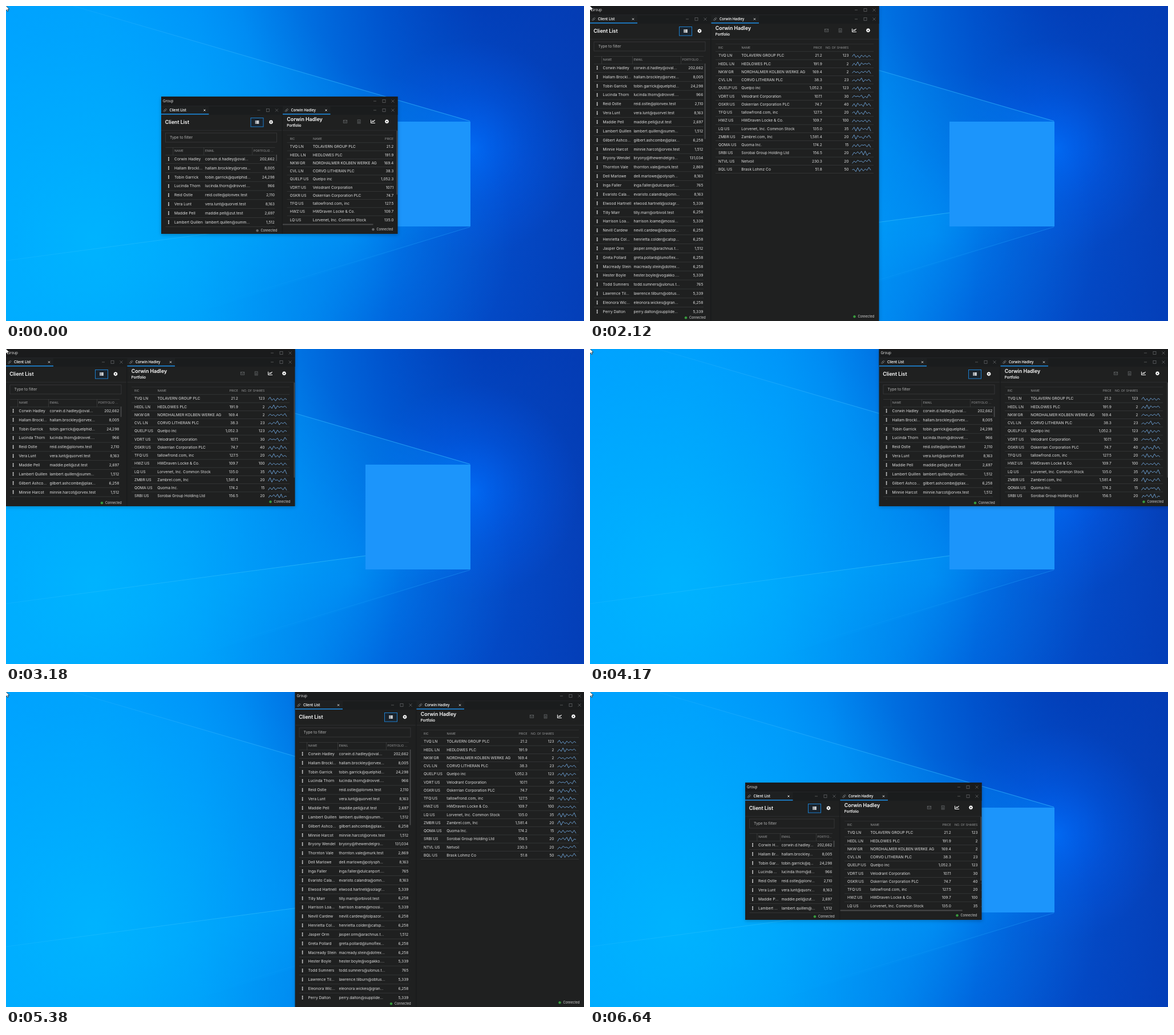
An HTML page with a canvas for the animation above (7900 ms loop, 1013 by 553 pixels).

```html
<!DOCTYPE html>
<html lang="en">
<head>
<meta charset="utf-8">
<title>Window snapping</title>
<style>
  html, body { margin: 0; width: 100%; height: 100%; overflow: hidden; background: #0a8cf5; }
  canvas { display: block; width: 1013px; height: 553px; }
</style>
</head>
<body>
<canvas id="stage" width="1013" height="553"></canvas>
<script>
const W = 1013, H = 553, LOOP = 7900;
const UI = 'Inter, sans-serif', FRAME = '"Open Sans", sans-serif';
const ctx = document.getElementById('stage').getContext('2d');

// name | mail domain | portfolio value
const clients = `Corwin Hadley|ovalmail.test|202,662
Hallam Brockley|orvex.test|8,005
Tobin Garrick|quelphid.test|24,298
Lucinda Thorn|drovvel.test|966
Reid Ostle|plonvex.test|2,110
Vera Lunt|quorvel.test|8,163
Maddie Pell|zut.test|2,697
Lambert Quillen|summerb.test|1,512
Gilbert Ashcombe|plaxo.test|6,258
Minnie Harcot|orvex.test|1,512
Bryony|thewendelgroup.test|131,034
Thornton Vale|murk.test|2,869
Dell Marlowe|polyspherix.test|8,163
Inga Faller|dulcanport.test|765
Evaristo Calandra|omnivar.test|8,163
Elwood Hartnell|solagro.test|5,339
Tilly Marr|orbivoil.test|6,258
Harrison Loame|mossiel.test|5,339
Nevill Cardew|tolpazor.test|6,258
Henrietta Colder|catspan.test|6,258
Jasper Orm|arachnus.test|1,512
Greta Pollard|lumoflexa.test|6,258
Macready Stein|dotrexa.test|6,258
Hester Boyle|vogakko.test|5,339
Todd Sumners|ulonus.test|765
Lawrence Tilburn|obtusa.test|5,339
Eleonora Wickes|grangel.test|6,258
Perry Dalton|suppliden.test|5,339`.split('\n').map((line, i) => {
  const [name, domain, value] = line.split('|');
  const user = name.toLowerCase().replace(' ', i ? '.' : '.d.');
  return { name: name === 'Bryony' ? 'Bryony Wendel' : name, email: user + '@' + domain, value };
});

const holdings = `TVQ:LN|TOLAVERN GROUP PLC|21.2|123
HEDL:LN|HEDLOWES PLC|191.9|2
NKW:GR|NORDHALMER KOLBEN WERKE AG|169.4|2
CVL:LN|CORVO LITHERAN PLC|38.3|23
QUELP:US|Quelpo inc|1,052.3|123
VDRT:US|Velodrant Corporation|107.1|30
OSKR:US|Oskerrian Corporation PLC|74.7|40
TFQ:US|tallowfrond.com, inc|127.5|20
HWZ:US|HWDraven Locke & Co.|109.7|100
LQ:US|Lorvenet, Inc. Common Stock|135.0|35
ZMBR:US|Zambrel.com, Inc|1,581.4|20
QOMA:US|Quoma Inc.|174.2|15
SRBI:US|Sorobai Group Holding Ltd|156.5|20
NTVL:US|Netvoil|230.3|20
BQL:US|Brask Lohmz Co|51.8|50`.split('\n').map(line => line.split('|'));

// Each step changes some of the window bounds; the views catch up a little later.
const steps = [
  [0, { x: 272.5, y: 160, w: 414, h: 240, viewW: 414, viewH: 240, split: 212.5, online: false }],
  [1840, { x: 0, y: 0, online: true }],
  [1910, { w: 506.5, h: 553 }],
  [1980, { viewW: 506.5 }],
  [2050, { viewH: 553 }],
  [3110, { h: 276 }],
  [3180, { viewH: 276 }],
  [4170, { x: 507 }],
  [5310, { h: 553 }],
  [5380, { viewH: 553 }],
  [6440, { x: 272.5, y: 160, w: 414, h: 240 }],
  [6510, { viewH: 240 }],
  [6580, { viewW: 414 }],
  [6640, { split: 166 }]
];
const stateAt = t => Object.assign({}, ...steps.filter(s => s[0] <= t).map(s => s[1]));

function text(g, str, x, y, size, color, { weight = 400, align = 'left', font = UI } = {}) {
  g.font = `${weight} ${size}px ${font}`;
  g.textAlign = align;
  g.fillStyle = color;
  g.fillText(str, x, y + size * 0.36);
}

function fit(g, str, width, size) {
  g.font = `400 ${size}px ${UI}`;
  if (g.measureText(str).width <= width) return str;
  while (str && g.measureText(str + '...').width > width) str = str.slice(0, -1);
  return str + '...';
}

function rect(g, x, y, w, h, color) {
  g.fillStyle = color;
  g.fillRect(x, y, w, h);
}

function path(g, points, color, width = 0.8) {
  g.beginPath();
  points.forEach(([x, y]) => g.lineTo(x, y));
  g.strokeStyle = color;
  g.lineWidth = width;
  g.stroke();
}

function frameRect(g, x, y, w, h, color, width = 1) {
  g.strokeStyle = color;
  g.lineWidth = width;
  g.strokeRect(x, y, w, h);
}

function disc(g, x, y, r, color) {
  g.beginPath();
  g.arc(x, y, r, 0, 7);
  g.fillStyle = color;
  g.fill();
}

function clipped(g, x, y, w, h, draw) {
  g.save();
  g.beginPath();
  g.rect(x, y, w, h);
  g.clip();
  draw();
  g.restore();
}

function cross(g, x, y, r, color, width) {
  path(g, [[x - r, y - r], [x + r, y + r]], color, width);
  path(g, [[x - r, y + r], [x + r, y - r]], color, width);
}

function windowButtons(g, right, y) {
  const color = '#606264';
  path(g, [[right - 42.5, y], [right - 37.5, y]], color);
  frameRect(g, right - 26.5, y - 2.5, 5, 5, color, 0.8);
  cross(g, right - 8.5, y, 2.5, color, 0.8);
}

function tab(g, x, label) {
  rect(g, x, 16, 83.5, 15, '#1e2021');
  rect(g, x, 29, 83.5, 1.6, '#1c88dc');
  g.save();
  g.translate(x + 6.8, 23);
  g.rotate(-Math.PI / 4);
  for (const dx of [-3, -0.2]) frameRect(g, dx, -1.1, 3.2, 2.2, '#85888a', 0.7);
  g.restore();
  text(g, label, x + 14.5, 23, 6.2, '#fff', { weight: 600, font: FRAME });
  cross(g, x + 76, 23, 1.5, '#eee', 0.9);
}

function gear(g, x, y) {
  for (let i = 0; i < 8; i++) {
    const a = i * Math.PI / 4, c = Math.cos(a), s = Math.sin(a);
    path(g, [[x + c, y + s], [x + c * 3.5, y + s * 3.5]], '#fff', 1.6);
  }
  disc(g, x, y, 2.7, '#fff');
  disc(g, x, y, 1.1, '#1f2021');
}

function listIcon(g, x, y) {
  for (let i = -1; i <= 1; i++) {
    rect(g, x - 3.2, y + i * 2 - 0.8, 1.7, 1.5, '#fff');
    rect(g, x - 1, y + i * 2 - 0.8, 4.4, 1.5, '#fff');
  }
}

function portfolioIcons(g, right) {
  const dim = '#65686a', y = 42.8;
  frameRect(g, right - 95.2, y - 2.4, 6.4, 4.8, dim, 0.8);
  path(g, [[right - 95, y - 1.5], [right - 92, y + 0.8], [right - 89, y - 1.5]], dim);
  frameRect(g, right - 70.3, y - 3, 4.8, 6.2, dim, 0.8);
  for (const dy of [-0.8, 0.6, 1.8]) path(g, [[right - 69.2, y + dy], [right - 66.6, y + dy]], dim, 0.6);
  path(g, [[right - 47, y - 3], [right - 47, y + 2.7], [right - 39.5, y + 2.7]], '#fff', 1);
  path(g, [[right - 45.6, y + 1], [right - 43.8, y - 1], [right - 42.6, y + 0.1], [right - 40, y - 2.6]], '#fff', 1.1);
  gear(g, right - 19, y);
}

function status(g, right, y, online) {
  text(g, 'Connected', right - 8.5, y, 5.5, '#d8d8d8', { align: 'right' });
  disc(g, right - 43, y, 2.2, online ? '#389b3d' : '#66686a');
}

function clientList(g, s) {
  const right = s.split - 1.5, slack = 211 - right;
  const emailSep = 74 - slack * 0.29, valueSep = 159 - slack * 0.763;
  const bottom = s.viewH - 12, area = bottom - 101;

  text(g, 'Client List', 6.3, 43.5, 8.8, '#fff', { weight: 600 });
  rect(g, right - 54.5, 36.5, 22, 15.5, '#1a232c');
  frameRect(g, right - 54.5, 36.5, 22, 15.5, '#1c7fce');
  listIcon(g, right - 43.5, 44);
  gear(g, right - 19, 43.7);
  frameRect(g, 7, 63, right - 16, 16, '#3a3b3c', 0.8);
  text(g, 'Type to filter', 14.5, 71, 6.7, '#b6b6b6');

  rect(g, 7, 88, right - 19, 0.7, '#3b3c3d');
  rect(g, 7, 101.5, right - 19, 0.7, '#3b3c3d');
  for (const x of [20, emailSep, valueSep]) rect(g, x, 88, 0.7, 13.5, '#414243');
  text(g, 'NAME', 22.8, 94.5, 5.3, '#98999a');
  text(g, 'EMAIL', emailSep + 2.5, 94.5, 5.3, '#98999a');
  text(g, slack ? 'PORTFO...' : 'PORTFOLIO ...', valueSep + 2.5, 94.5, 5.1, '#98999a');

  clipped(g, 0, 100, right, bottom - 100, () => {
    clients.forEach((c, i) => {
      const y = 108.5 + i * 15.85;
      if (y > bottom + 10) return;
      for (const dy of [-2.3, 0, 2.3]) rect(g, 11.8, y + dy - 0.8, 1.6, 1.6, '#fff');
      text(g, fit(g, c.name, emailSep - 24, 6.7), 22.5, y, 6.7, '#e0e0e0');
      text(g, fit(g, c.email, valueSep - emailSep - 4, 6.7), emailSep + 2.5, y, 6.7, '#e0e0e0');
      text(g, c.value, right - 12.7, y, 6.6, '#e0e0e0', { align: 'right' });
      rect(g, 7, y + 7.6, right - 19, 0.7, '#3b3c3d');
    });
  });
  rect(g, right - 10.3, 101, 1.7, area * area / 1460, '#4a4b4c');
  status(g, right, s.viewH - 5.8, s.online);
}

function sparkline(g, x, y, seed) {
  const points = [];
  for (let i = 0; i < 11; i++) {
    const noise = Math.sin((seed + 1) * 12.9 + i * 78.2) * 437.5;
    const level = noise - Math.floor(noise);
    const swing = i % 2 ? 1 : -1;
    points.push([x + i * 3.25, y + 0.5 - swing * (0.3 + level * 3.7)]);
  }
  path(g, points, '#6fa5dc', 0.9);
}

function portfolio(g, s) {
  const left = s.split, right = s.viewW, paneW = right - left;
  const wide = paneW > 285;
  const bottom = s.viewH - (wide ? 15 : 18), area = s.viewH - 17 - 59;
  const priceX = left + 194.3, sharesX = left + 241;

  text(g, clients[0].name, left + 7.3, 39.2, 8.8, '#fff', { weight: 600 });
  text(g, 'Portfolio', left + 7.3, 50.2, 6.2, '#fff', { weight: 600 });
  portfolioIcons(g, right);

  clipped(g, left, 60, paneW - 1, bottom - 60, () => {
    const lineW = paneW - 17;
    const gray = '#98999a';
    rect(g, left + 7.5, 66.5, lineW, 0.7, '#343536');
    text(g, 'RIC', left + 12.5, 73, 5.3, gray);
    text(g, 'NAME', left + 53, 73, 5.3, gray);
    text(g, 'PRICE', priceX, 73, 5.3, gray, { align: 'right' });
    text(g, 'NO. OF SHARES', sharesX, 73, 5.3, gray, { align: 'right' });
    rect(g, left + 7.5, 79.5, lineW, 0.7, '#3b3c3d');
    holdings.forEach(([ric, name, price, shares], i) => {
      const y = 87 + i * 14.25;
      text(g, ric, left + 12.5, y, 6.6, '#e0e0e0');
      text(g, name, left + 52.7, y, 6.7, '#e0e0e0');
      text(g, price, priceX, y, 6.6, '#e0e0e0', { align: 'right' });
      text(g, shares, sharesX, y, 6.6, '#e0e0e0', { align: 'right' });
      sparkline(g, left + 247, y, i);
      rect(g, left + 7.5, y + 6.8, lineW, 0.7, '#3b3c3d');
    });
  });
  if (area < 240) rect(g, right - 2, 59, 1.6, area * area / 240, '#48494a');
  if (!wide) rect(g, left, s.viewH - 17.5, paneW * paneW / (122 + paneW * 0.666), 2, '#48494a');
  status(g, right, s.viewH - 7.8, s.online);
}

function groupWindow(g, s) {
  g.save();
  g.translate(s.x, s.y);
  g.shadowColor = 'rgba(0,0,0,.22)';
  g.shadowBlur = 6;
  g.shadowOffsetY = 2;
  rect(g, -0.5, -1, s.w + 0.5, s.h + 1, '#1f2020');
  g.shadowColor = 'transparent';

  clipped(g, -0.5, -1, s.w + 0.5, s.h + 1, () => {
    rect(g, -0.5, -1, s.w + 1, 16, '#1a1b1c');
    rect(g, -0.5, 15, s.w + 1, 16, '#1a1c1d');
    rect(g, -0.5, 15, s.w + 1, 0.7, '#26292b');
    text(g, 'Group', 2.5, 7.2, 6.2, '#eee', { font: FRAME });
    windowButtons(g, s.w, 7);
    tab(g, -0.5, 'Client List');
    tab(g, s.split, clients[0].name);
    windowButtons(g, s.split - 2, 23);
    windowButtons(g, s.w, 23);
    rect(g, -0.5, 57.8, s.w + 1, 0.8, '#303132');
    rect(g, s.split - 1.5, 31, 1.5, s.viewH - 31, '#191a1b');
    clientList(g, s);
    portfolio(g, s);
  });
  g.restore();
}

function gradient(g, shape, ...stops) {
  const fill = shape.length === 4 ? g.createLinearGradient(...shape)
    : g.createRadialGradient(shape[0], shape[1], 0, shape[0], shape[1], shape[2]);
  stops.forEach((c, i) => fill.addColorStop(i / (stops.length - 1), c));
  return fill;
}

function polygon(g, points, fill) {
  g.beginPath();
  points.forEach(([x, y]) => g.lineTo(x, y));
  g.fillStyle = fill;
  g.fill();
}

function makeDesktop() {
  const canvas = document.createElement('canvas');
  canvas.width = W;
  canvas.height = H;
  const g = canvas.getContext('2d');
  const wash = (...args) => rect(g, 0, 0, W, H, gradient(g, ...args));

  wash([0, 0, W, 0], '#009eff', '#009cfc', '#0090f8', '#007bea', '#0061dc', '#044fcb', '#0540b8');
  wash([150, 410, 540], 'rgba(0,190,255,.72)', 'rgba(0,185,255,.4)', 'rgba(0,180,255,0)');
  wash([830, -40, 420], 'rgba(0,40,160,.5)', 'rgba(0,50,170,.25)', 'rgba(0,60,180,0)');
  wash([900, 600, 360], 'rgba(0,55,180,.3)', 'rgba(0,60,190,0)');
  wash([815, 250, 190], 'rgba(0,112,255,.75)', 'rgba(0,100,250,.3)', 'rgba(0,90,240,0)');
  wash([600, 400, 290], 'rgba(0,160,255,.42)', 'rgba(0,155,255,.18)', 'rgba(0,150,255,0)');

  polygon(g, [[118, 0], [813, 202], [813, 388], [630, 363], [0, 447], [0, 0]],
    gradient(g, [480, 80, 430, 270], 'rgba(0,165,255,.26)', 'rgba(0,165,255,.1)'));
  polygon(g, [[630, 363], [813, 388], [290, 553], [0, 553], [0, 447]],
    gradient(g, [500, 375, 540, 490], 'rgba(0,175,255,.3)', 'rgba(0,165,255,.06)'));
  path(g, [[118, 0], [813, 202]],
    gradient(g, [118, 0, 813, 202], 'rgba(70,190,255,.12)', 'rgba(50,180,255,.55)', 'rgba(60,190,255,.6)'), 1.3);
  path(g, [[0, 447], [630, 363]],
    gradient(g, [0, 447, 630, 363], 'rgba(90,210,255,.12)', 'rgba(70,205,255,.5)'), 1);
  path(g, [[360, 525], [813, 388]],
    gradient(g, [360, 525, 813, 388], 'rgba(40,170,255,0)', 'rgba(40,170,255,.4)'), 1);

  rect(g, 630, 203, 184, 184, '#1c95fb');
  return canvas;
}

function pointer(g) {
  const points = [[-1, -1.5], [-1, 8.5], [1.2, 6.6], [2.6, 9.6], [4.2, 8.9], [2.9, 6], [5.8, 5.7], [-1, -1.5]];
  polygon(g, points, '#fff');
  path(g, points, '#111', 0.7);
}

const desktop = makeDesktop();
const start = performance.now();

function render() {
  const t = (performance.now() - start) % LOOP;
  ctx.drawImage(desktop, 0, 0);
  groupWindow(ctx, stateAt(t));
  pointer(ctx);
  requestAnimationFrame(render);
}
render();
</script>
</body>
</html>
```
